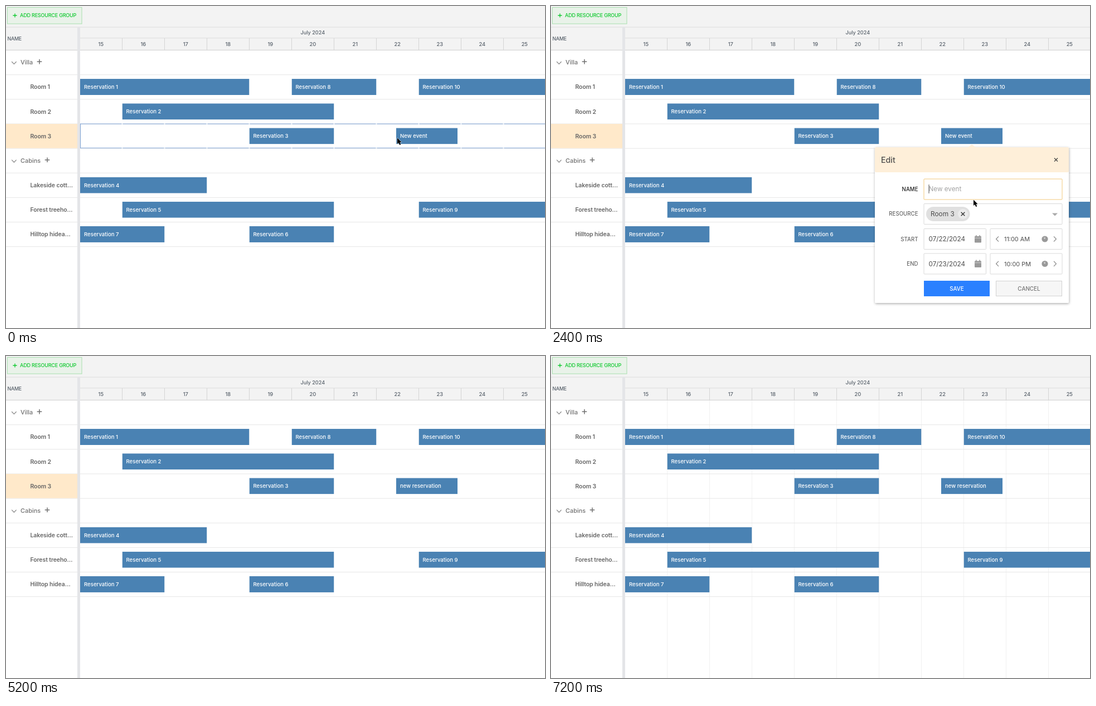
These frames come from a looping animation (967 by 579 pixels, 7400 ms). An HTML page:

```html
<!DOCTYPE html>
<html lang="en">
<head>
<meta charset="utf-8">
<title>Reservation timeline</title>
<style>
html, body { margin: 0; width: 100%; height: 100%; overflow: hidden; background: #fff; }
svg { display: block; }
text { font-family: Inter, "Open Sans", sans-serif; font-weight: 500; white-space: pre; }
</style>
</head>
<body>
<svg id="stage" width="967" height="579" viewBox="0 0 967 579"></svg>
<script>
const LOOP = 7400, STEP = 200;
const LEFT = 133, DAY = 76, DAY0 = 132.5, ROW0 = 79.5, ROW = 44.15;
const BLUE = '#4a82b3', GREEN = '#0fc92f', GREY = '#707070', INK = '#4c4c4c';
const stage = document.getElementById('stage');
const dayX = n => DAY0 + (n - 15) * DAY;
const rowY = i => ROW0 + i * ROW;
const days = [...Array(11).keys()].map(i => i + 15);

const rect = (x, y, w, h, fill, extra = '') =>
  `<rect x="${x}" y="${y}" width="${w}" height="${h}" fill="${fill}" ${extra}/>`;
const line = (x1, y1, x2, y2, color, w = 1) =>
  `<path d="M${x1} ${y1}L${x2} ${y2}" stroke="${color}" stroke-width="${w}"/>`;
const stroke = (d, color, w) =>
  `<path d="${d}" fill="none" stroke="${color}" stroke-width="${w}"/>`;
const text = (s, x, y, size, fill, extra = '') =>
  `<text x="${x}" y="${y}" font-size="${size}" fill="${fill}" ${extra}>${s}</text>`;
const plus = (x, y, r, color, w) => stroke(`M${x - r} ${y}h${2 * r}M${x} ${y - r}v${2 * r}`, color, w);
const cross = (x, y, r, color, w) =>
  stroke(`M${x - r} ${y - r}l${2 * r} ${2 * r}M${x + r} ${y - r}l${-2 * r} ${2 * r}`, color, w);
const group = (id, body) => `<g id="${id}">${body}</g>`;
const MID = 'text-anchor="middle"', END = 'text-anchor="end"';

// label, row, first day, end day
const bookings = [
  ['Reservation 1', 1, 15, 19], ['Reservation 8', 1, 20, 22], ['Reservation 10', 1, 23, 27],
  ['Reservation 2', 2, 16, 21], ['Reservation 3', 3, 19, 21], ['Reservation 4', 5, 15, 18],
  ['Reservation 5', 6, 16, 21], ['Reservation 9', 6, 23, 27],
  ['Reservation 7', 7, 15, 17], ['Reservation 6', 7, 19, 21]
];

function bar(label, row, x, w, id = '') {
  const inner = rect(0, 0, '100%', 29, BLUE) + text(label, 7, 18, 9.6, '#fff');
  return `<svg ${id && `id="${id}"`} class="bar" data-row="${row}" x="${x}" y="${rowY(row) + 7.4}" width="${w}" height="29">${inner}</svg>`;
}

function sidebar() {
  let s = '';
  for (const [name, row, px] of [['Villa', 0, 60], ['Cabins', 4, 74]]) {
    const y = rowY(row);
    s += stroke(`M10.2 ${y + 20.5}l4.2 4.4l4.2 -4.4`, '#8a8a8a', 1.3);
    s += text(name, 26, y + 25.5, 10.9, GREY, 'font-weight="400"') + plus(px, y + 20.6, 4.3, '#707070', 1.5);
  }
  ['Room 1', 'Room 2', 'Room 3', '', 'Lakeside cott…', 'Forest treeho…', 'Hilltop hidea…']
    .forEach((name, i) => s += text(name, 43.5, rowY(i + 1) + 25.7, 10.5, '#666', 'style="font-weight:600;letter-spacing:-.1px"'));
  return s;
}

function header() {
  let s = rect(0, 0, 967, 79, '#f3f3f3');
  s += rect(2.5, 2.5, 133.5, 29.5, '#e9f2e9', 'stroke="#a8dfae"');
  s += plus(16, 17, 3.6, GREEN, 1.3);
  s += text('ADD RESOURCE GROUP', 25, 20.3, 9.1, GREEN, 'letter-spacing="-.25"');
  s += line(0, 38, 967, 38, '#dcdcdc') + line(LEFT, 57.7, 967, 57.7, '#dcdcdc');
  s += line(0, 79.3, 967, 79.3, '#d6d6d6', 1.3);
  s += text('NAME', 2.5, 61.7, 8.9, '#57606a', 'letter-spacing="-.25"');
  s += text('July 2024', 550.3, 51.3, 9.1, '#57606a', MID);
  for (const d of days) {
    s += text(d, dayX(d) + 37.8, 72, 9.3, '#57606a', MID);
    if (d > 15) s += line(dayX(d), 58, dayX(d), 79, '#d4d4d4');
  }
  return s;
}

function outline() {
  let s = `<rect x="133.5" y="212" width="840" height="43.3" fill="none" stroke="#7ba0d3"/>`;
  for (const d of days.slice(1)) s += rect(dayX(d) - 1, 211, 2, 2, '#eef3fa') + rect(dayX(d) - 1, 254, 2, 2, '#eef3fa');
  return s;
}

function tooltip() {
  let s = rect(653, 150, 161, 64, '#fff', 'filter="url(#soft)"');
  [170.3, 190.5].forEach((y, i) => {
    s += `<circle cx="671.7" cy="${y}" r="6.9" fill="#fff6e6" stroke="#eea63c" stroke-width="1.5"/>`;
    s += stroke(`M669 ${y - 3.4}L671.7 ${y}V${y - 4.6}`, '#555', 1);
    s += text('', 685, y + 4.6, 11, INK, `id="tip${i}" style="font-weight:400"`);
  });
  return s;
}

const field = (x, y, w, color = '#d9d9d9') => rect(x, y, w, 37, '#fff', `stroke="${color}" rx="1"`);

function dateRow(y, label, date, time) {
  const c = y + 18.5;
  let s = text(label, 658.5, c + 3.5, 9.7, '#666', END);
  s += field(669, y, 111.5) + field(788, y, 129);
  s += text(date, 677.5, c + 4.2, 11.7, INK, 'style="font-weight:400"');
  s += rect(760, c - 5, 12, 11.5, '#999', 'rx="1"') + rect(762, c - 7, 1.6, 3, '#999') + rect(768.4, c - 7, 1.6, 3, '#999');
  s += line(760, c - 1.8, 772, c - 1.8, '#ddd', .8);
  s += stroke(`M803 ${c - 4.6}l-4.4 4.6l4.4 4.6M902 ${c - 4.6}l4.4 4.6l-4.4 4.6`, '#888', 1.2);
  s += text(time, 813, c + 4, 10.9, INK, 'style="font-weight:400"');
  s += `<circle cx="886" cy="${c}" r="5.6" fill="#999"/>` + stroke(`M884 ${c - 2.5}L886 ${c}V${c - 3.6}`, '#eee', .9);
  return s;
}

function dialog() {
  let s = `<g filter="url(#soft)">${rect(581, 254, 348, 280, '#fff', 'rx="2"')}</g>`;
  s += '<path d="M747 255l8 -6l8 6z" fill="#feefd9"/>' + rect(581, 254, 348, 45, '#feefd9', 'rx="2"');
  s += text('Edit', 592, 281.5, 14.2, INK) + cross(906, 276.5, 3, '#444', 1.3);
  s += text('NAME', 658.5, 332.5, 9.7, '#222', END) + field(669, 311, 248, '#f3c97c');
  s += text('New event', 677.5, 333.3, 11.7, '#a0a0a0', 'id="input" style="font-weight:400"');
  s += rect(677.5, 321, 1, 16, '#555', 'id="caret"');
  s += text('RESOURCE', 658.5, 377.4, 9.7, '#666', END) + field(669, 355.5, 248);
  s += rect(673, 361, 78.5, 26, '#e0e0e0', 'rx="13"') + text('Room 3', 681, 378, 11.9, INK, 'style="font-weight:400"');
  s += '<circle cx="739" cy="374" r="9" fill="#ececec"/>' + cross(739, 374, 3.3, '#333', 1.4);
  s += '<path d="M899 372.5h10l-5 5z" fill="#aaa"/>';
  s += dateRow(400.5, 'START', '07/22/2024', '11:00 AM') + dateRow(445, 'END', '07/23/2024', '10:00 PM');
  s += rect(669, 494, 118, 28, '#2a80ff') + text('SAVE', 728, 511.6, 9.9, '#fff', MID);
  s += rect(798.5, 494.5, 118, 27, '#f6f6f6', 'stroke="#d2d2d2"') + text('CANCEL', 857.5, 511.6, 9.9, '#777', MID);
  return s;
}

function build() {
  let s = `<defs><filter id="soft" x="-10%" y="-20%" width="120%" height="140%">
    <feDropShadow dx="0.5" dy="1.5" stdDeviation="2" flood-color="#000" flood-opacity=".33"/></filter></defs>`;
  s += rect(0, 0, 967, 579, '#fff');
  s += group('grid', days.slice(1).map(d => line(dayX(d), 80, dayX(d), 579, '#f1f1f1')).join(''));
  for (let i = 1; i < 9; i++) s += line(0, rowY(i), 967, rowY(i), '#e6e6e6');
  s += group('rowTint', rect(0, 212, 128, 43.7, '#ffe9ca')) + header() + sidebar();
  s += rect(128, 38, 5, 541, '#e4e5e8');
  s += group('hover', outline());
  s += bookings.map(([n, r, a, b]) => bar(n, r, Math.max(LEFT, dayX(a)), dayX(b) - Math.max(LEFT, dayX(a)))).join('');
  s += bar('New event', 3, 700, 110, 'fresh');
  s += group('tip', tooltip()) + group('dialog', dialog());
  s += group('cursor', '<path d="M0 0V10.6L2.4 8.5L4.3 12.6L6.3 11.7L4.5 7.7H7.6Z" fill="#000" stroke="#fff" stroke-width=".9" paint-order="stroke"/>');
  stage.innerHTML = s;
}
build();

const $ = id => document.getElementById(id);
const show = (id, on) => $(id).setAttribute('display', on ? 'inline' : 'none');
const clamp = v => Math.max(0, Math.min(1, v));
const ease = (t, a, b) => { const p = clamp((t - a) / (b - a)); return p * p * (3 - 2 * p); };
const mix = (a, b, p) => a + (b - a) * p;
const bars = [...document.querySelectorAll('.bar')];
const freshLabel = $('fresh').querySelector('text');

function stamp(hour) {
  const h = hour % 24;
  return `Jul ${22 + Math.floor(hour / 24)}, 2024 ${h % 12 || 12}:00 ${h < 12 ? 'AM' : 'PM'}`;
}

function cursorAt(t) {
  const drag = ease(t, 50, 1150), toForm = ease(t, 1400, 2350), toSave = ease(t, 3150, 3800);
  const x = mix(mix(mix(702, 810, drag), 758, toForm), 731.3, toSave);
  const y = mix(mix(mix(237.3, 236.8, drag), 348.5, toForm), 502.8, toSave);
  return [x, y];
}

function draw(t) {
  const reload = t >= 6000, dragging = t >= 200 && t < 1400;
  const [cx, cy] = cursorAt(t);
  show('grid', reload);
  show('rowTint', !reload);
  show('hover', t < 200);

  const endHour = dragging ? Math.max(12, Math.round((cx - dayX(22)) / DAY * 24)) : 46;
  const endX = dayX(22) + endHour * DAY / 24;
  show('fresh', t >= 200);
  $('fresh').setAttribute('width', endX - 700);
  freshLabel.textContent = t < 4000 ? 'New event' : 'new reservation';

  show('tip', dragging);
  $('tip').setAttribute('transform', `translate(${endX - 810.2} 0)`);
  $('tip0').textContent = stamp(11);
  $('tip1').textContent = stamp(endHour);

  show('dialog', t >= 1800 && t < 4000);
  const typed = 'new reservation'.slice(0, Math.max(0, Math.floor((t - 2600) / 1000 * 15)));
  const input = $('input');
  input.textContent = typed || 'New event';
  input.setAttribute('fill', typed ? INK : '#a0a0a0');
  $('caret').setAttribute('x', 677.5 + (typed ? input.getComputedTextLength() + 1 : 0));

  show('cursor', t < 4400);
  $('cursor').setAttribute('transform', `translate(${cx} ${cy})`);

  // rows fade in one after another when the page reloads
  for (const b of bars) {
    const i = b.dataset.row - 1;
    b.setAttribute('opacity', reload ? clamp((t - 6402 - 46 * i) / 250) : 1);
  }
}

function tick() {
  const t = performance.now() % LOOP;
  draw(Math.floor(t / STEP) * STEP);
  requestAnimationFrame(tick);
}
tick();
</script>
</body>
</html>
```
